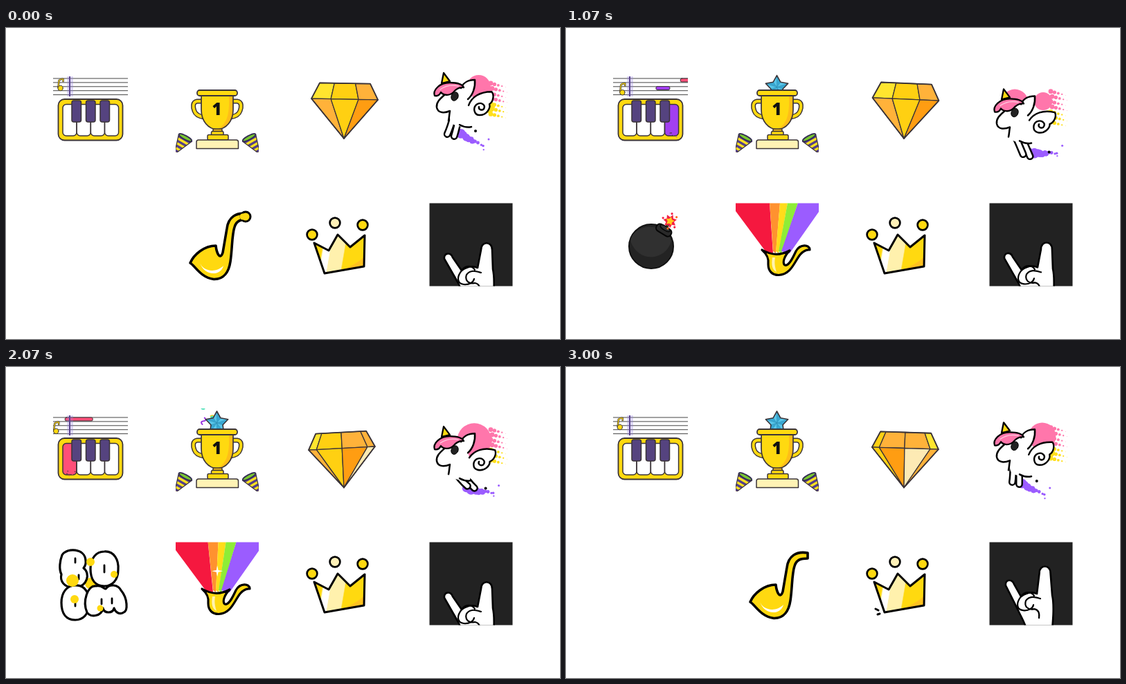
An HTML page with a canvas for the animation above (3.07 s loop, 800 by 450 pixels).

```html
<!DOCTYPE html>
<html lang="en">
<head>
<meta charset="utf-8">
<title>Sticker sheet</title>
<style>
html, body { margin: 0; width: 100%; height: 100%; overflow: hidden; background: #fff; }
canvas { display: block; width: 800px; height: 450px; }
</style>
</head>
<body>
<canvas id="stage" width="800" height="450"></canvas>
<script>
const c = document.getElementById('stage').getContext('2d');
const LOOP = 3070, STEPS = 46;
const INK = '#3b3438', GOLD = '#ffd910', AMBER = '#ffb23a', PINK = '#ff76ab', VIOLET = '#9b5cff';
let t = 0, tick = 0;

const mix = (a, b, k) => Array.isArray(a) ? a.map((v, i) => mix(v, b[i], k)) : a + (b - a) * k;
const rnd = n => { const s = Math.sin(n * 12.9898) * 43758.5453; return s - Math.floor(s); };
const ramp = (a, b, x = t) => Math.max(0, Math.min(1, (x - a) / (b - a)));
const ease = (a, b, x = t) => { const k = ramp(a, b, x); return k * k * (3 - 2 * k); };
const bump = (mid, width, x = t) => 1 - ease(0, width, Math.abs(x - mid));
const during = (a, b) => t >= a && t < b;
// Cosine with n turns per loop, shifted by a part of a turn.
const wave = (n, shift = 0) => Math.cos(2 * Math.PI * (n * t / LOOP + shift));
// Position within the beat, three beats per loop.
const beat = () => (3 * t / LOOP) % 1;
const thump = () => bump(670, 160) + bump(2470, 160);

function draw(d, fill, stroke, w = 2) {
  const p = new Path2D(d);
  if (fill) { c.fillStyle = fill; c.fill(p); }
  if (stroke) { c.strokeStyle = stroke; c.lineWidth = w; c.stroke(p); }
}
const poly = pts => 'M' + pts.map(p => p.join(' ')).join('L') + 'Z';
function oval(x, y, rx, ry, fill, stroke, w = 2, rot = 0) {
  c.beginPath();
  c.ellipse(x, y, rx, ry, rot, 0, 7);
  if (fill) { c.fillStyle = fill; c.fill(); }
  if (stroke) { c.strokeStyle = stroke; c.lineWidth = w; c.stroke(); }
}
const dot = (x, y, r, fill, stroke, w) => oval(x, y, r, r, fill, stroke, w);
function box(x, y, w, h, r, fill, stroke, lw = 1.5) {
  c.beginPath();
  c.roundRect(x, y, w, h, r);
  if (fill) { c.fillStyle = fill; c.fill(); }
  if (stroke) { c.strokeStyle = stroke; c.lineWidth = lw; c.stroke(); }
}
function tube(d, outer, inner, edge, fill) {
  draw(d, null, edge, outer);
  draw(d, null, fill, inner);
}
function at(x, y, rot, scale, fn) {
  c.save();
  c.translate(x, y);
  c.rotate(rot * Math.PI / 180);
  c.scale(scale, scale);
  fn();
  c.restore();
}
function clipped(d, fn) {
  c.save();
  c.clip(new Path2D(d));
  fn();
  c.restore();
}
function star(n, R, r) {
  return Array.from({ length: n * 2 }, (_, i) => {
    const a = Math.PI * (i / n - .5), q = i % 2 ? r : R;
    return [q * Math.cos(a), q * Math.sin(a)];
  });
}

const NOTES = [
  { hue: '#2e86de', key: 1, hit: 643, speed: .15, y: 90.5, w: 26, from: 560, to: 800 },
  { hue: '#a23ff0', key: 3, hit: 1323, speed: .15, y: 84.5, w: 20, from: 930, to: 1250 },
  { hue: '#ff4f78', key: 0, hit: 1985, speed: .08, y: 73, w: 40, from: 1930, to: 2660 }
];
function piano() {
  clipped('M68 66h108v34h-108z', () => {
    for (let i = 0; i < 5; i++) draw(`M68 ${73 + i * 5.9}H176`, null, '#444', 1);
    for (const n of NOTES) box(92 - (t - n.hit) * n.speed, n.y, n.w, 5, 2, n.hue, INK, 1);
    c.fillStyle = 'rgba(150,130,225,.3)';
    c.fillRect(88, 70, 9, 29);
    c.fillStyle = '#5b4590';
    c.fillRect(91, 70, 2, 29);
    const x = 77.5 + 5.5 * wave(1, -.22), y = 91 - 4 * wave(1);
    tube(`M${x - 3} ${y - 1}L${x - 2} ${y - 11}Q${x + 1} ${y - 14} ${x + 4} ${y - 13}V${y - 10}`, 2.6, 1.2, INK, GOLD);
    dot(x, y, 3.7, GOLD, INK, 1);
  });
  at(0, 10 * thump(), 0, 1, () => {
    box(75.5, 103, 93, 59.5, 9, GOLD, INK, 1.8);
    for (let i = 0; i < 4; i++) {
      const x = 82 + i * 20.2, note = NOTES.find(n => n.key === i && during(n.from, n.to));
      box(x, 110.5, 20, 45.5, [i ? 1 : 5, i > 2 ? 5 : 1, 5, 5], note ? note.hue : '#fff', INK);
      if (note) for (let j = 0; j < 6; j++)
        dot(x + 3 + 15 * rnd(j + tick), 149 + 9 * rnd(j * 3 + tick), .8, j % 2 ? INK : note.hue);
    }
    for (let i = 0; i < 3; i++) box(95 + i * 20.5, 105, 13.5, 31, 3, '#55437f', INK);
  });
}

function popper() {
  const cone = 'M249.5 153.5L268.5 164L243 183Z', k = thump();
  at(-2 * k, k, 0, 1, () => {
    draw(cone, '#ffe21f');
    clipped(cone, () => {
      for (let d = 0; d < 30; d += 6)
        draw(`M${243 - d * .5} ${153 + d}L${271 - d * .5} ${169 + d}`, null, '#54408a', 3.4);
    });
    draw(cone, null, INK, 1.2);
    oval(259, 158.6, 10.5, 2.8, '#79c832', '#352d55', 1.8, .5);
  });
}

function confetti() {
  const hues = ['#45dfb5', '#9b35e0', '#f6ca16', '#f03a45'];
  const fall = (t - 2470) * (t < 2470 ? .122 : .22);
  for (let i = 0; i < 22; i++) {
    const hue = hues[i % 4];
    at(247 + 116 * rnd(i + 3), 66 + 70 * rnd(i + 50) + fall, rnd(i) * 180 + t * .1, 1, () => {
      if (i % 4 === 1 || i % 4 === 2) draw('M-5 0Q-2.5 -5 0 0T5 0', null, hue, 2);
      else oval(0, 0, 3.4, 2.7, hue);
    });
  }
  if (t < 2070) box(284, 60 + (t - 1670) * .122, 6, 3, 1.5, '#35e5c0');
}

function trophy() {
  if (during(1600, 2940)) confetti();
  at(304.5, mix(115, 81, ease(800, 1150)), 0, 1, () => {
    const s = star(5, 17, 9);
    draw(poly(s), '#58c6ea');
    s.forEach((p, i) => {
      if (i % 2 === 0) draw(poly([[0, 0], p, s[i + 1]]), '#38a8d2');
      draw(`M0 0L${p}`, null, '#2f88ad', .5);
    });
    draw(poly(s), null, INK, 1.6);
  });
  for (const side of [1, -1]) {
    c.save();
    if (side < 0) { c.translate(610, 0); c.scale(-1, 1); }
    popper();
    tube('M284 106H276C269 107 270 115 272 120C274 126 279 128 286 129', 7, 4, INK, GOLD);
    c.restore();
  }
  const cup = 'M282 97V118C282 135 292 146 305 147C318 146 328 135 328 118V97Z';
  draw(cup, GOLD);
  draw('M322 98H328V118C328 135 318 146 305 147C319 139 323 126 322 98Z', '#ffbe18');
  draw(cup, null, INK, 1.7);
  box(276, 90, 58, 8, 3.5, GOLD, INK, 1.8);
  box(299, 146, 13, 6, 1, '#f4b916', INK);
  box(296.5, 149.5, 17.5, 6, 2, GOLD, INK);
  box(291, 154.5, 30, 7.5, 2, GOLD, INK);
  box(275, 162, 60.5, 12.5, [3, 3, 0, 0], '#fff3b5', INK);
  c.fillStyle = '#111';
  c.font = '800 24px "Open Sans", sans-serif';
  c.textAlign = 'center';
  c.fillText('1', 304.5, 126);
}

// An eight-sided gem that turns; each facet keeps its own shade.
const SHADES = { y: '#ffe52f', g: '#ffd012', o: AMBER, d: '#ff9d12', p: '#fdeab4' };
function diamond() {
  const turn = 23 * t / LOOP, first = Math.floor(turn), part = turn - first;
  const edge = j => 48 * Math.max(-1, Math.min(1, 1.085 * Math.sin((j + part - 1.5) * Math.PI / 4)));
  at(488, 160 + 14.5 * ease(1150, 1500), 3.2 * wave(2, .195), 1, () => {
    for (let j = -1; j < 4; j++) {
      const angle = j + part;
      const a = angle < -.5 ? -48 : edge(j), b = angle > 2.5 ? 48 : edge(j + 1);
      if (b - a < 1) continue;
      const side = ((j - first) % 8 + 8) % 8;
      draw(poly([[a * .76, -80], [b * .76, -80], [b, -57], [a, -57]]), SHADES['ygooyogy'[side]], INK, 1.3);
      draw(poly([[a, -57], [b, -57], [0, 0]]), SHADES['ogdpoodp'[side]], INK, 1.3);
    }
    draw('M-36.5 -80H36.5L48 -57L0 0L-48 -57Z', null, INK, 1.8);
  });
}

function splash(dy) {
  dot(697, 114 + dy * .6, 9, '#ffdf1c');
  dot(668 + 20 * wave(4, .12), 85 + dy, 20 - 5 * wave(4, -.15), PINK);
  dot(689, 92 + dy * .6, 13, PINK);
  for (let i = 0; i < 5; i++) for (let j = 0; j < 7; j++) {
    const x = 700 + i * 5.4 + (j % 2) * 2, y = 80 + j * 7.4 + i * 1.4 + dy * .5;
    dot(x, y, Math.max(.4, 3.4 - i * .75), j > 3 ? '#ffdf1c' : PINK);
  }
  const x = 663 - 11 * wave(4), y = 152 + dy - 4 * wave(4), drop = 14 + 12 * wave(4);
  for (let i = 0; i < 13; i++) {
    const k = i / 12;
    dot(x + 39 * k + 4 * rnd(i) - 2, y + drop * k + 5 * rnd(i + 40) - 2, 7.5 * (1 - k * .8) * (.5 + .5 * rnd(i + 9)), VIOLET);
  }
  dot(x + 45, y + drop - 13, 1.5, VIOLET);
  dot(x + 26, y + 1, 2, '#000');
}

function unicorn() {
  const dy = 14.5 * ease(690, 1050) + 5 - 5 * wave(4);
  splash(dy);
  at(0, dy, 0, 1, () => {
    const fx = 653 - 18 * wave(4, -.08), fy = 155 + 5 * wave(4, -.3);
    for (const i of [1, 0])
      tube(`M${646 + 8 * i} 127Q${(647 + fx) / 2 + 9 * i} ${143 + i} ${fx + 10 * i} ${fy + 3 * i}`, 11, 6, '#000', '#fff');
    draw('M640 88C632 98 622 106 622 114C623 124 634 123 641 120C640 130 641 138 647 140C655 143 664 144 670 142C672 130 671 112 667 103C676 96 678 84 677 75C668 75 660 79 657 86Z', '#fff');
    draw('M633 97C626 103 621 108 622 115C624 124 634 123 641 120C640 126 640 130 639 134M657 87C660 79 668 75 677 75C678 86 674 97 667 103M655 140Q664 145 672 143', null, '#000', 2.5);
    draw('M619 98C616 90 626 79 641 79C650 79 658 80 661 86C654 85 650 88 646 93C640 99 631 97 628 93C626 97 623 99 619 98Z', PINK, '#000', 2.3);
    draw('M627 89C634 84 644 82 653 84', null, '#ffc3da', 1.5);
    draw('M629 80L632 65L641 77Z', GOLD, '#000', 2.3);
    oval(648, 99, 5, 6.5, '#222', '#000', 1, .4);
    at(676, 115, 9 - 9 * wave(4, -.05), 1, () =>
      draw('M-8 -3C-4 -15 8 -23 25 -23C29 -19 28 -9 22 -5C24 1 18 11 8 11C0 11 -2 1 3 -4C10 -9 17 -4 14 2C11 5 6 3 7 -1', '#fff', '#000', 2.4));
  });
}

function bomb() {
  at(123, 316, 0, ramp(250, 400), () => {
    dot(0, 0, 32, '#232323', '#111', 2);
    draw('M-30 -8C-25 -34 20 -36 29 -8C22 20 -18 26 -30 -8Z', '#303030');
    const [x, y] = mix([33, -46], [20, -25], ramp(400, 1900));
    const fuse = `M20 -25Q24 -30 ${x} ${y}`;
    tube(fuse, 4, 1.6, '#111', '#8a5a35');
    at(18, -23, 32, 1, () => {
      box(-12, -6, 24, 11, 5, '#292929', '#050505', 2);
      oval(0, -4, 8, 3, '#343434', '#080808', 1.5);
    });
    at(x, y, tick * 37, 1, () => {
      draw(poly(star(7, 10, 6)), '#f51f43');
      draw(poly(star(5, 6.5, 3.5)), '#ffc81d');
      for (let i = 0; i < 5; i++) {
        const a = i * 1.26 + rnd(i + tick);
        dot(11 * Math.cos(a), 11 * Math.sin(a), 1.6, i % 2 ? '#ff6b24' : '#f51f43');
      }
    });
  });
}

const LETTER = {
  O: ['M0 -25C14 -26 21 -13 20 1C20 17 11 25 0 25C-13 25 -20 16 -20 0C-20 -15 -12 -25 0 -25Z', 'M0 -5V5'],
  B: ['M-17 -20C-10 -31 16 -30 17 -12C18 -4 14 -2 14 -1C24 6 20 26 2 27C-16 28 -20 16 -18 8C-22 0 -20 -12 -17 -20Z', 'M2 -15V-9M7 9V15'],
  M: ['M-27 18C-34 2 -26 -22 -14 -20C-6 -22 -3 -16 0 -16C6 -24 18 -22 22 -14C32 -2 32 16 26 18C20 22 14 18 12 12C10 20 -2 20 -4 12C-6 24 -22 26 -27 18Z', 'M-6 -1V6M9 -2V5']
};
function boom() {
  const k = ramp(2070, 2470), spread = 1 + .08 * k;
  const place = [['O', 17, -24, -4], ['B', -27, -24, 5], ['O', -25, 25, 6], ['M', 19, 21, -8]];
  const blobs = [[-29, -7, 9], [-3, -34, 6], [31, -16, 5], [-26, 20, 6], [11, 33, 4.5]];
  at(125, 316, 0, ramp(1880, 2000) * (1 - ramp(2780, 2900)), () => {
    if (k > .3) [[-5, -44, 10], [-42, 3, 7], [42, 2, 9]].forEach(s => dot(...s, GOLD));
    else dot(-3, -3, 8, GOLD);
    for (const [id, x, y, rot] of place) at(x * spread, (y - 3 * k) * spread + 3 * k, rot * k, 1, () => {
      draw(LETTER[id][0], '#fff', '#000', 3.2);
      draw(LETTER[id][1], null, '#000', 2.8);
    });
    if (k <= .3) blobs.forEach(s => dot(...s, GOLD));
  });
}

function sax() {
  if (during(800, 2730)) horn();
  else if (during(470, 2860)) {
    tube('M304 354Q321 351 331 334Q338 316 351 319', 10, 4.5, '#000', GOLD);
    dot(302, 331.5, 24, GOLD, '#000', 3.4);
  } else {
    draw('M349 269C332 266 321 274 319 290L313 325C309 337 304 325 303 315C286 315 271 328 266 340C273 344 281 361 300 363.5C315 364 322 352 324 338C327 318 326 300 330 288C333 278 340 277 349 277Z', GOLD, '#000', 3.6);
    draw('M280 339C283 351 302 356 314 344C310 360 285 359 280 339Z', '#fff');
    if (t < 300) { dot(346, 273, 7, GOLD, '#000', 3); dot(342, 273, 4.5, GOLD); }
  }
}

function horn() {
  const sway = 11 * wave(3.4, -1.185) - 11;
  const tops = [236, ...[294, 309, 320, 335].map(x => x + sway), 374], foot = [288, 299, 303, 307, 311, 323];
  at(305, 325, 0, ramp(780, 930) * (1 - ramp(2650, 2740)), () => {
    c.translate(-305, -325);
    ['#f5183f', '#ff922f', '#ffdc1a', '#8eed37', VIOLET].forEach((hue, i) =>
      draw(poly([[tops[i], 253], [tops[i + 1], 253], [foot[i + 1], 326], [foot[i], 323]]), hue));
    const k = ramp(1600, 2550) ** 2;
    if (t > 1600) at(301 + 17 * k, 310 - 60 * k, 0, 1, () => draw(poly(star(4, 8, 2)), '#fff'));
  });
  draw('M283 321C291 328 293 334 292 342C292 352 298 357.5 307 357.5C325 357 330 338 338 328Q345 320 352 321C352 313 338 312 332 323C326 336 321 345 316 343C312 340 315 330 323 322Q303 333 283 321Z', GOLD, '#000', 3.2);
  draw('M298 332C296 343 298 350 304 353C301 344 301 338 302 332Z', '#fff3b0');
}

function crown() {
  const u = beat(), turn = ease(.1, .38, u) * (1 - ease(.7, .88, u)), tip = bump(.414, .12, u);
  const front = [[445, 311], [466, 322], [479, 299], [497, 317], [518, 300], [517, 345], [460, 355]];
  const turned = [[457, 312], [466, 303], [485, 319], [505, 302], [525, 318], [518, 353], [458, 346]];
  const balls = mix([[442, 299], [515, 285], [475, 282]], [[469, 284], [506, 283], [506, 283]], turn);
  at(488, 335, 6 * tip * turn, 1, () => {
    c.translate(-488, -335);
    if (turn > .5 && tip < .5) draw('M470 304L481 296L494 312L484 318ZM511 307L519 305L528 314L522 322Z', AMBER, '#000', 2.6);
    const shift = 19 * turn, g = c.createLinearGradient(444 + shift, 318, 520 + shift, 331);
    [[0, GOLD], [.16, GOLD], [.19, '#fff'], [.31, '#fff'], [.32, '#fff1ad'], [.57, '#fff1ad'], [.59, GOLD]]
      .forEach(s => g.addColorStop(...s));
    const body = poly(mix(front, turned, turn));
    draw(body, g);
    clipped(body, () => draw('M465 356Q506 346 524 324V360Z', 'rgba(255,182,40,.65)'));
    draw(body, null, '#000', 3);
    balls.forEach(([x, y], i) => dot(x, y, 7.4, i === 2 ? '#fff1b8' : GOLD, '#000', 2.7));
  });
  if (tip > .5) draw('M530 345L534 342', null, '#000', 4);
  if (u > .9) draw('M447 350L451 352M450 358L453 357', null, '#000', 3);
}

function rock() {
  const flash = during(2390, 2610), u = beat();
  const lift = ease(.02, .35, u) * (1 - ease(.86, 1, u));
  c.fillStyle = flash ? GOLD : '#222';
  c.fillRect(611, 253, 122, 122);
  if (flash) draw('M664 253H701L697 297H721L700 340H660V300Z', '#fff');
  // Tips of index finger and little finger, then the knuckles.
  const [i, p, k] = mix([[694, 311], [638, 327], [667, 357]], [[689, 264], [642, 290], [665, 318]], lift);
  const o = (q, x, y) => `${q[0] + x} ${q[1] + y}`;
  const hand = `M${o(k, 2, 62)}C${o(k, 1, 36)} ${o(k, -8, 26)} ${o(k, -14, 12)}L${o(p, -5, 7)}C${o(p, -6, -2)} ${o(p, 4, -3)} ${o(p, 7, 5)}L${o(k, -9, -6)}Q${o(k, 3, -15)} ${o(k, 14, -10)}L${o(i, -8, 10)}C${o(i, -8, -3)} ${o(i, 8, -3)} ${o(i, 8, 10)}L${o(k, 36, -8)}C${o(k, 40, 10)} ${o(k, 36, 40)} ${o(k, 34, 62)}Z`;
  draw(hand, flash ? GOLD : '#fff');
  if (flash) clipped(hand, () =>
    draw(`M${o(k, -25, -20)}L${o(k, -8, -6)}Q${o(k, -2, 16)} ${o(k, 16, 25)}Q${o(k, 28, 24)} ${o(k, 37, 8)}V380H640Z`, '#b79e10'));
  draw(hand, null, '#000', 2.6);
  at(...k, 0, 1, () =>
    draw('M-9 -6C-17 4 -15 13 -6 14C2 15 8 11 9 6M-9 -6C-4 -14 6 -14 10 -7M10 12C2 14 -5 9 -2 0C4 -8 12 -5 19 -3M10 12C16 13 18 18 17 25', null, '#000', 2.2));
}

const stepTime = n => Math.round(n * 20 / 3) * 10;
function frame() {
  const now = performance.now() % LOOP;
  tick = STEPS - 1;
  while (stepTime(tick) > now) tick--;
  t = stepTime(tick);
  c.fillStyle = '#fff';
  c.fillRect(0, 0, 800, 450);
  c.lineJoin = c.lineCap = 'round';
  piano();
  clipped('M245 60h120v120h-120z', trophy);
  diamond();
  unicorn();
  if (during(250, 1930)) bomb();
  if (during(1930, 2900)) boom();
  clipped('M245 253.5h120v120h-120z', sax);
  crown();
  clipped('M611.5 253.5h120v120h-120z', rock);
  requestAnimationFrame(frame);
}
frame();
</script>
</body>
</html>
```
